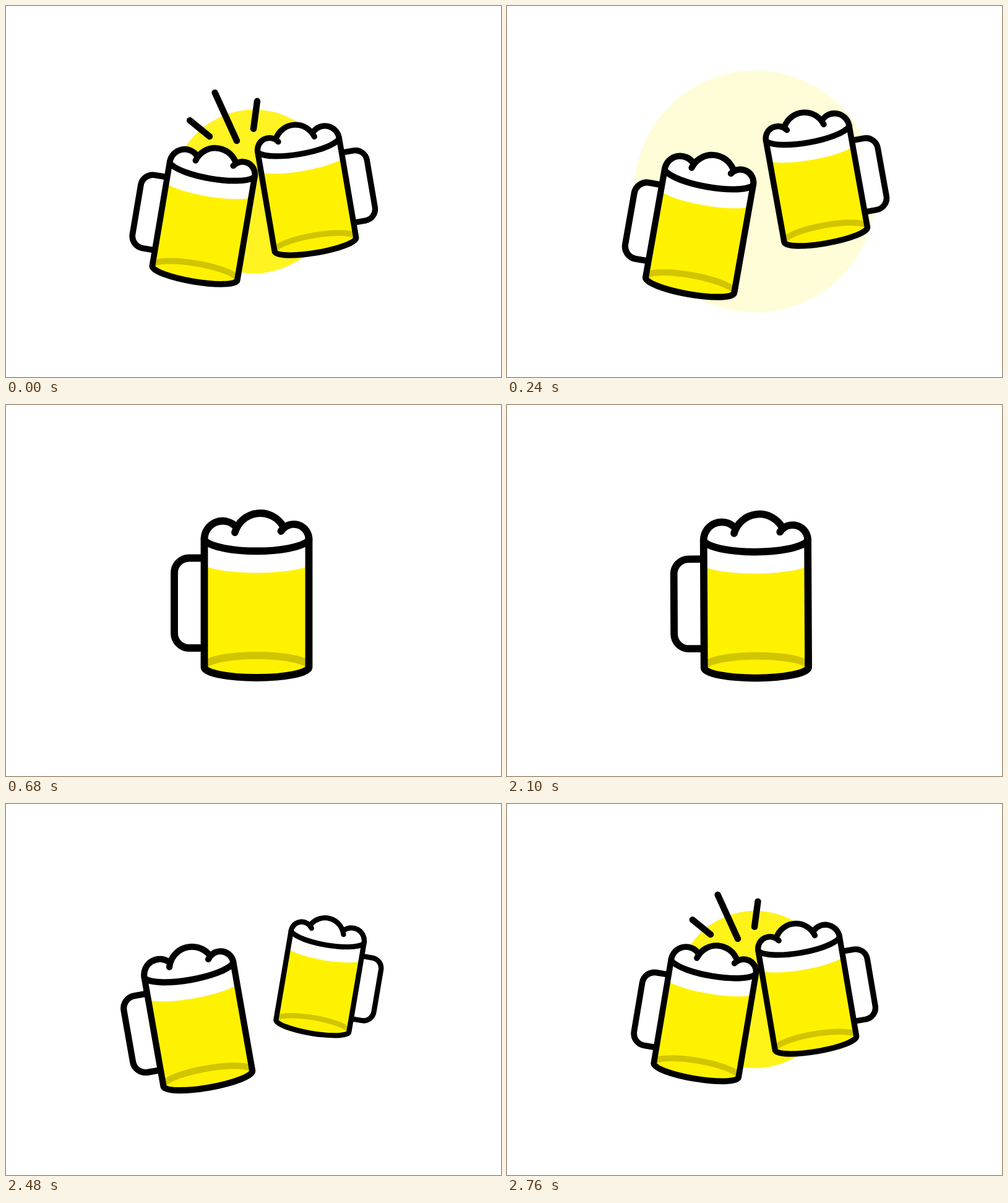
Write an HTML page that moves like this. It is 800x600 px and loops after 2.78 s.

```html
<!DOCTYPE html>
<html lang="en">
<head>
<meta charset="utf-8">
<title>Cheers</title>
<style>
  html, body { margin: 0; width: 100%; height: 100%; overflow: hidden; background: #fff; }
  svg { display: block; width: 100vw; height: 100vh; }
  .line { fill: none; stroke: #000; stroke-width: 11.8; stroke-linecap: round; stroke-linejoin: round; }
  .ray { stroke: #000; stroke-width: 10.4; stroke-linecap: round; }
</style>
</head>
<body>
<svg viewBox="0 0 800 600">
  <defs>
    <g id="mug">
      <path class="line" style="fill:#fff" d="M-84.5-74.5H-109A24 24 0 0 0-133-50.5V47A24 24 0 0 0-109 71H-84.5"/>
      <path fill="#fff" d="M-84.5-105A29.5 29.5 0 0 1-33-124.6A42.6 42.6 0 0 1 43-125.5A24.5 24.5 0 0 1 84.5-104.5V102A84.5 17 0 0 1-84.5 102Z"/>
      <path fill="#fff200" d="M-84.5-62C-50-46.7 50-46.7 84.5-62V102A84.5 17 0 0 1-84.5 102Z"/>
      <path fill="none" stroke="#d1c500" stroke-width="12" d="M-84.5 98C-60 78 60 78 84.5 98"/>
      <path class="line" d="M-84.5-105V102A84.5 17 0 0 0 84.5 102V-104.5M-84.5-103C-60-80 60-80 84.5-103"/>
      <path class="line" d="M-84.5-105A29.5 29.5 0 0 1-33-124.6M-35-116A42.6 42.6 0 0 1 43-125.5M39.5-118A24.5 24.5 0 0 1 84.5-104.5"/>
    </g>
  </defs>
  <circle id="burst" cx="401" cy="300" fill="#fff200"/>
  <g id="rays"></g>
  <use id="back" href="#mug"/>
  <use id="front" href="#mug"/>
</svg>
<script>
const LOOP = 2780, STEP = 20;
const $ = id => document.getElementById(id);
const set = (el, attrs) => { for (const name in attrs) el.setAttribute(name, attrs[name]); };

// Progress of t from a to b, held at 0 and 1 outside
const ramp = (t, a, b) => Math.min(1, Math.max(0, (t - a) / (b - a)));
const smooth = u => u * u * (3 - 2 * u);
const smoother = u => u * u * u * (u * (6 * u - 15) + 10);
const soft = u => (u + smooth(u)) / 2;
const easeOut = u => u * (2 - u);

const pose = (at, x, y, angle, scale, ease = soft) => ({ at, ease, values: [x, y, angle, scale] });

// Rest, wind up, clink, swing apart, rest. Negative times lead up to the loop start.
const front = [
  pose(-700, 405, 322, 0, 1),
  pose(-270, 307, 358.8, -10.4, 0.857),
  pose(-40, 320, 347, 9.5, 0.82),
  pose(230, 310.8, 365.1, 10, 0.86),
  pose(680, 405, 322, 0, 1, smoother)
];
const back = [
  pose(-520, 425, 302, 3, 0.5),
  pose(-270, 514.5, 286.6, 10.2, 0.725),
  pose(-40, 484.8, 308.3, -9.6, 0.788),
  pose(230, 500.7, 288.8, -10.2, 0.808),
  pose(520, 426.7, 299, -2.5, 0.56, smoother)
];

function poseAt(poses, t) {
  const found = poses.findIndex(p => t < p.at);
  const i = found < 0 ? poses.length - 1 : Math.max(1, found);
  const from = poses[i - 1], to = poses[i];
  const k = to.ease(ramp(t, from.at, to.at));
  return from.values.map((v, n) => v + (to.values[n] - v) * k);
}

function placeMug(el, [x, y, angle, scale], flip, opacity) {
  set(el, {
    transform: `translate(${x} ${y}) rotate(${angle}) scale(${scale * flip} ${scale})`,
    opacity
  });
}

function drawBurst(t) {
  const u = ramp(t, -112, 280);
  set($("burst"), { r: 103 * (1 + u), opacity: u > 0 ? 1 - u ** 1.6 : 0 });
}

// Inner end, then the offset to the outer end
const rays = [[329, 211, -32, -26], [373, 218, -35.5, -78], [400, 198.7, 6, -45]];
const rayLines = rays.map(() => {
  const line = document.createElementNS("http://www.w3.org/2000/svg", "line");
  line.setAttribute("class", "ray");
  return $("rays").appendChild(line);
});

// The outer end shoots out, the inner end follows until the ray is gone
function drawRays(t) {
  const outer = 1.15 * easeOut(ramp(t, -140, 80));
  const inner = 1.15 * smooth(ramp(t, 20, 180));
  $("rays").style.display = outer > inner ? "" : "none";
  rays.forEach(([x, y, dx, dy], i) => set(rayLines[i], {
    x1: x + dx * inner, y1: y + dy * inner,
    x2: x + dx * outer, y2: y + dy * outer
  }));
}

function draw(time) {
  const t = time > LOOP / 2 ? time - LOOP : time;
  placeMug($("front"), poseAt(front, t), 1, 1);
  placeMug($("back"), poseAt(back, t), -1, ramp(t, -500, -300) - ramp(t, 280, 520));
  drawBurst(t);
  drawRays(t);
}

const start = performance.now();
function tick() {
  const elapsed = (performance.now() - start) % LOOP;
  draw(Math.floor(elapsed / STEP) * STEP);
  requestAnimationFrame(tick);
}
tick();
</script>
</body>
</html>
```
